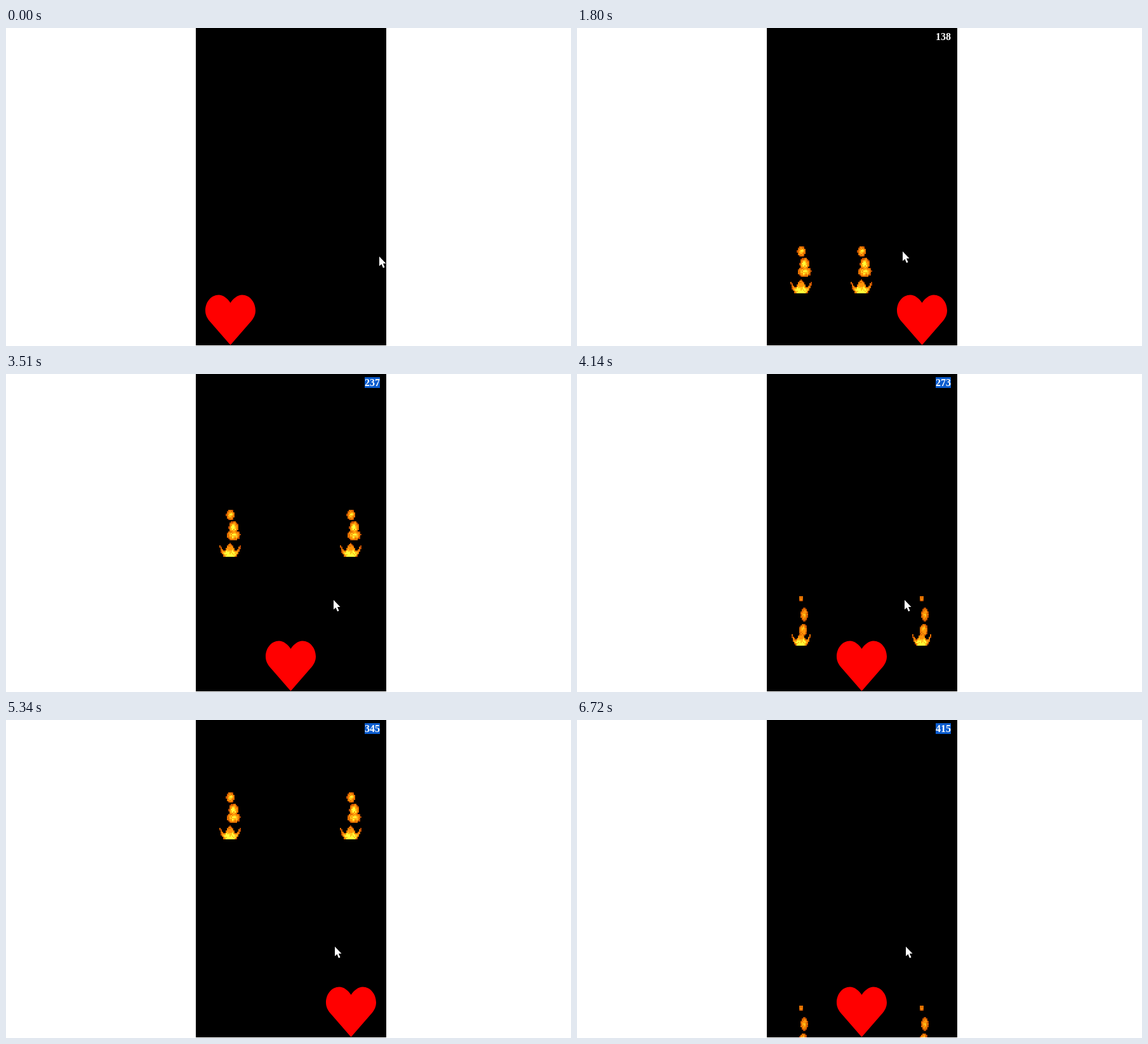
An HTML page with a canvas that plays this animation: 890 px wide and 501 px high, repeating every 6750 ms.

```html
<!DOCTYPE html>
<html lang="en">
<head>
<meta charset="utf-8">
<title>Dodge the flames</title>
<style>
html, body { margin: 0; width: 100%; height: 100%; overflow: hidden; background: #fff; }
canvas { display: block; }
</style>
</head>
<body>
<canvas id="stage" width="890" height="501"></canvas>
<script>
const ctx = document.getElementById('stage').getContext('2d');
const LOOP = 6750, FRAME = 30, FLICKER = 930;
const laneX = lane => 314 + 95 * lane;

// Straight lines through [time, value] points, extended at both ends
function tween(keys, t) {
  let i = 1;
  while (i < keys.length - 1 && t > keys[i][0]) i++;
  const [t0, a] = keys[i - 1], [t1, b] = keys[i];
  return a + (b - a) * (t - t0) / (t1 - t0);
}

// A flame is a jagged bowl with puffs [y, rx, ry] swaying above it
const poses = [
  { until: 135, w: 15, h: 15, bottom: 77, puffs: [[11, 11, 8], [34, 7, 10], [55, 4, 12]] },
  { until: 435, w: 17, h: 22, bottom: 80, puffs: [[6, 4, 5], [31, 6, 11], [55, 7, 10]] },
  { until: 680, w: 17, h: 16, bottom: 80, puffs: [[35, 9, 7], [52, 9, 11], [62, 4, 10]] },
  { until: 900, w: 19, h: 22, bottom: 80, puffs: [[14, 7, 9], [34, 8, 11], [46, 11, 9]] }
];
const shades = [[.22, '#b84800'], [.5, '#e27000'], [.78, '#ff9408'], [.93, '#ffc41c'], [9, '#ffff38']];
const sway = y => 42 + 3 * Math.sin((y - 24) / 10);

function puffHeat(x, y, [py, rx, ry]) {
  const d = ((x - sway(py)) / rx) ** 2 + ((y - py) / ry) ** 2;
  return Math.min(1, rx / 8) * (1 - d);
}

function bowlHeat(x, y, { w, h, bottom }) {
  const u = (x - 39) / w, v = (bottom - y) / h;
  if (v < 0) return 0;
  const side = .5 + .5 * v ** .6 - Math.abs(u);
  const rim = .75 + .25 * Math.cos(2 * Math.PI * u) - v;
  return Math.min(1.15 - .75 * v - .4 * u * u, 4 * side, 4 * rim);
}

function makeFlame(pose) {
  const sprite = document.createElement('canvas');
  sprite.width = sprite.height = 80;
  const g = sprite.getContext('2d');
  for (let y = 1; y < 80; y += 2) for (let x = 1; x < 80; x += 2) {
    const heat = Math.max(bowlHeat(x, y, pose), ...pose.puffs.map(p => puffHeat(x, y, p)));
    const noise = Math.abs(Math.sin(x * 12.99 + y * 78.23) * 43758.5) % 1;
    if (heat < .15 * noise + .02) continue;
    g.fillStyle = shades.find(s => heat + (noise - .5) * .3 < s[0])[1];
    g.fillRect(x - 1, y - 1, 2, 2);
  }
  return sprite;
}
const flames = poses.map(makeFlame);
const flameAt = t => flames[Math.max(0, poses.findIndex(p => t % FLICKER < p.until))];

// Waves of flames: lanes and points [time, top] on the way down
const waves = [
  { lanes: [0, 1], path: [[1140, 183], [2070, 399]] },
  { lanes: [0, 2], path: [[2520, -32], [3510, 208], [4710, 478]] },
  { lanes: [0, 2], path: [[5340, 108], [6720, 448]] }
];
const score = [[1140, 99], [2520, 181], [4710, 305], [5340, 345], [6720, 415]];
const SELECTED = 3210;

// Key presses that move the heart one lane
const rightKeys = [900, 1290, 3270, 4980, 5160];
const leftKeys = [2910, 3060, 4770, 5910];
const pressed = (keys, t) => keys.filter(k => k <= t).length;
const heartLane = t => pressed(rightKeys, t) - pressed(leftKeys, t);

// The pointer glides between resting places: start, duration, dx, dy
const glides = [[0, 660, -75, -8], [2850, 360, 3, 4], [4890, 240, 2, 1]];
function pointer(t) {
  let x = 588, y = 360;
  for (const [start, span, dx, dy] of glides) {
    const p = Math.min(1, Math.max(0, (t - start) / span));
    x += dx * p;
    y += dy * p;
  }
  return [Math.round(x), Math.round(y)];
}

const heart = new Path2D('M39.5 13C35 6 28 .5 21 .5C9 .5 0 12 0 25C0 32 3 37 6 41L39.5 79.5L73 41C76 37 79 32 79 25C79 12 70 .5 58 .5C51 .5 44 6 39.5 13Z');
const arrow = new Path2D('M0 0V15L3.5 12L6 18L8.5 17L6 11H10.5Z');

function fillAt(path, x, y, color) {
  ctx.save();
  ctx.translate(x, y);
  ctx.fillStyle = color;
  ctx.fill(path);
  ctx.restore();
}

function drawScore(t) {
  if (t < FRAME) return;
  if (t >= SELECTED) {
    ctx.fillStyle = '#0a5ccf';
    ctx.fillRect(565, 5, 24, 17);
  }
  ctx.font = 'bold 16px "Liberation Serif", "Times New Roman", serif';
  ctx.textAlign = 'right';
  ctx.fillStyle = '#fff';
  ctx.fillText(Math.round(tween(score, t)), 589, 19);
}

function draw(now) {
  const t = Math.floor(now % LOOP / FRAME) * FRAME;
  ctx.fillStyle = '#fff';
  ctx.fillRect(0, 0, 890, 501);
  ctx.save();
  ctx.beginPath();
  ctx.rect(299, 0, 300, 500);
  ctx.clip();
  ctx.fillStyle = '#000';
  ctx.fillRect(299, 0, 300, 500);
  fillAt(heart, laneX(heartLane(t)), 420, '#f00');
  for (const { lanes, path } of waves) {
    const y = Math.round((tween(path, t) + 2) / 5) * 5 - 2; // falls in steps of 5
    for (const lane of lanes) ctx.drawImage(flameAt(t), laneX(lane), y);
  }
  drawScore(t);
  fillAt(arrow, ...pointer(t), '#fff');
  ctx.restore();
}

let start;
function tick(now) {
  start ??= now;
  draw(now - start);
  requestAnimationFrame(tick);
}
draw(0);
requestAnimationFrame(tick);
</script>
</body>
</html>
```
